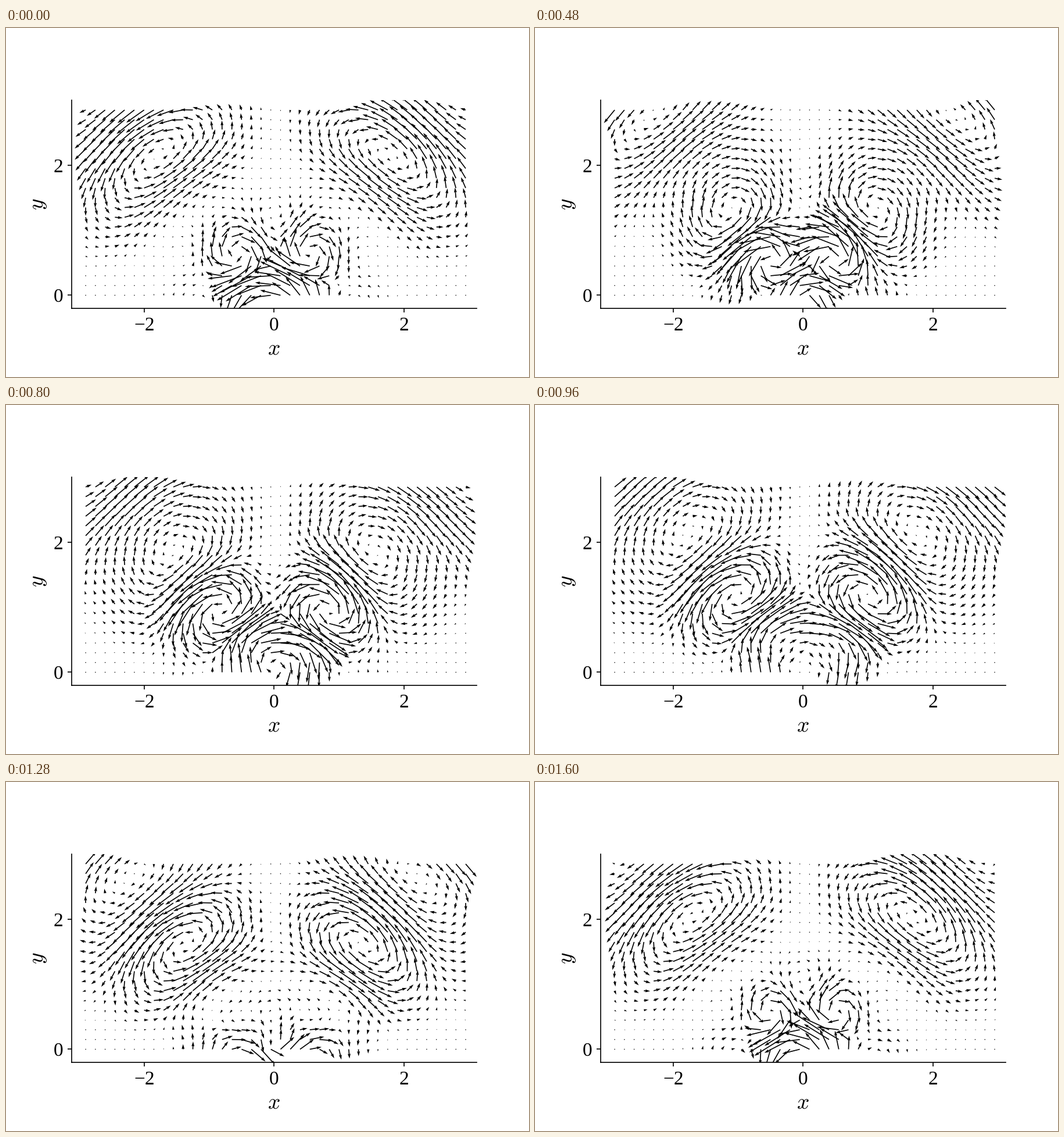
Write a matplotlib script that moves like this. It is 900x600 px and loops after 1.68 s.

```python
import numpy as np
import matplotlib.pyplot as plt
from matplotlib.animation import FuncAnimation

FRAMES = 21
INTERVAL = 80
K = 2.0  # radial wavenumber of the fundamental

plt.rcParams.update({
    "font.family": "Liberation Serif",
    "font.size": 16,
    "mathtext.fontset": "cm",
})


def delay(r, core):
    """Radial phase lag that flattens out inside the core."""
    return K * (np.sqrt(r**2 + core**2) - core)


def stream(x, y, phase):
    """Stream function of a source at the origin with two harmonics."""
    r2 = x**2 + y**2
    r = np.sqrt(r2)

    near1 = (20 - 14 * y) * np.exp(-r2)
    near1 = near1 * np.cos(phase - delay(r, 0.15) - 0.17)
    near2 = -22 * y * np.exp(-r2 / 0.65)
    near2 = near2 * np.cos(2 * (phase - delay(r, 0.8)))

    far1 = 100 * x**2 * y**3 / (r2 + 0.25)**2.5
    far1 = far1 * np.cos(phase - K * r - 0.91)
    far2 = 49 * x**2 * y**2 / (r2 + 0.16)**2 * np.exp(-r2 / 5)
    far2 = far2 * np.cos(2 * (phase - K * r) - 0.44)

    return near1 + near2 + far1 + far2


def velocity(x, y, phase, h=1e-4):
    u = stream(x, y + h, phase) - stream(x, y - h, phase)
    v = stream(x - h, y, phase) - stream(x + h, y, phase)
    return u / (2 * h), v / (2 * h)


X, Y = np.meshgrid(-2.9 + 0.15 * np.arange(40), 0.15 * np.arange(20))

fig, ax = plt.subplots(figsize=(6, 4), dpi=150)
ax.set_aspect("equal")
ax.set_xlim(-3.12, 3.12)
ax.set_ylim(-0.2, 3)
ax.set_xticks([-2, 0, 2])
ax.set_yticks([0, 2])
ax.set_xlabel("$x$", fontsize=18)
ax.set_ylabel("$y$", fontsize=18)
ax.spines[["top", "right"]].set_visible(False)

# Arrow lengths are given directly in pixels.
arrows = ax.quiver(X, Y, *velocity(X, Y, 0.0), scale=1, scale_units="dots")


def update(i):
    arrows.set_UVC(*velocity(X, Y, 2 * np.pi * i / FRAMES))
    return (arrows,)


anim = FuncAnimation(fig, update, frames=FRAMES, interval=INTERVAL,
                     repeat=True, repeat_delay=0)
plt.show()
```
